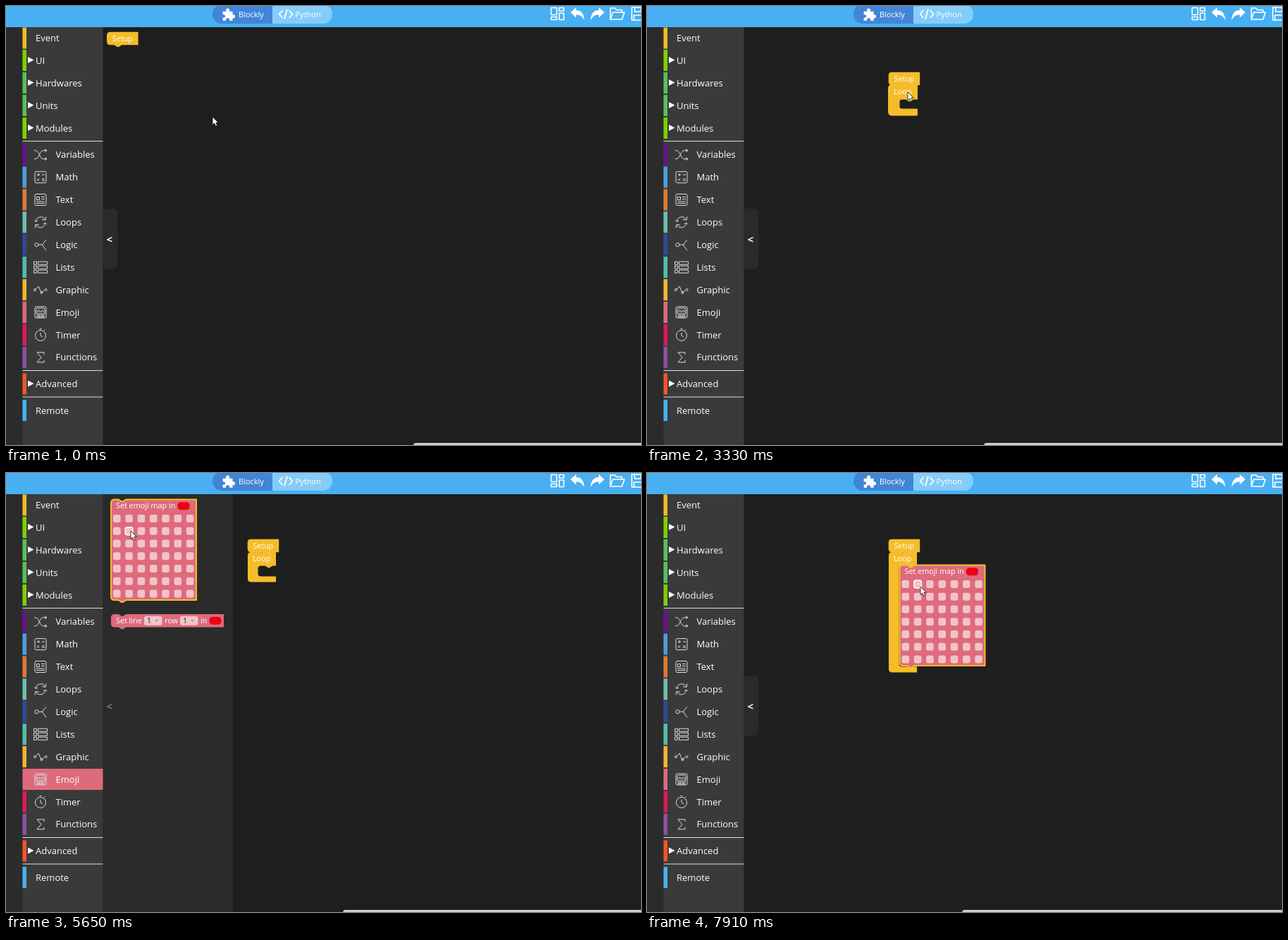
Recreate the animation shown at these times as an HTML page with a canvas. Size 901 px wide and 622 px high, loop 8 s.

```html
<!DOCTYPE html>
<html lang="en">
<head>
<meta charset="utf-8">
<title>Block editor</title>
<style>
  html, body { margin: 0; width: 100%; height: 100%; overflow: hidden; background: #1e1e1e; }
  canvas { display: block; width: 901px; height: 622px; }
</style>
</head>
<body>
<canvas id="stage"></canvas>
<script>
const W = 901, H = 622, LOOP = 8000;
const canvas = document.getElementById('stage');
const g = canvas.getContext('2d');
const dpr = window.devicePixelRatio || 1;
canvas.width = W * dpr;
canvas.height = H * dpr;

const FONT = '"Open Sans", "Noto Sans", sans-serif';
const YELLOW = '#f5bd2a', PINK = '#dd6b7c', RED = '#ee0011', PANEL = '#2a2a2a';

// Screen refreshes: [first, last, count]
const STEPS = [
  [0, 0, 1], [150, 1080, 8], [1200, 1320, 2], [1470, 2130, 6], [2250, 3180, 8], [3330, 4290, 8],
  [4410, 4830, 4], [5110, 5650, 5], [5770, 6050, 3], [6200, 6590, 4], [6740, 7130, 4], [7280, 7910, 6]
];
const TICKS = STEPS.flatMap(([a, b, n]) =>
  Array.from({ length: n }, (_, i) => n > 1 ? a + (b - a) * i / (n - 1) : a));

// Pointer path: [time, x, y]
const PATH = [
  [0, 293, 157], [150, 288, 152], [500, 163, 46], [640, 163, 46], [1080, 368, 95], [1320, 366, 98],
  [1470, 362.5, 103], [1600, 362.5, 103], [1990, 95, 54], [2130, 92, 57], [2250, 92, 57],
  [2550, 170, 46], [2660, 170, 46], [3050, 368, 121], [3330, 370, 122], [3500, 366, 130],
  [4150, 94, 438], [4290, 88, 448], [4430, 88, 455], [4600, 90, 459], [4830, 88, 445],
  [5110, 88, 444], [5230, 92, 400], [5650, 177, 82], [5770, 179, 78], [6050, 193, 56],
  [6200, 206, 66], [6590, 349.5, 144], [7000, 402, 149], [7280, 402, 149], [7450, 400, 152],
  [7780, 388, 161], [8000, 388, 161]
];
const GRABS = [[560, 1560], [2650, 3300], [6150, 7250]];

const ROWS = [
  ['Event', '#f6bb2b', 45.5], ['UI', '#7fd000', 77, 1], ['Hardwares', '#57c25a', 109, 1],
  ['Units', '#57c25a', 141, 1], ['Modules', '#7fd000', 173, 1],
  ['Variables', '#6a1094', 210.7, 'M-9-6h1c7 0 6 12 12 12h5M-9 6h1c7 0 6-12 12-12h5M6-8l3 2-3 2M6 4l3 2-3 2'],
  ['Math', '#4a9ee0', 242.6, 'M-8-6q0-2 2-2H6q2 0 2 2V6q0 2-2 2H-6q-2 0-2-2ZM-5-3.5h4M-3-5.5v4M2-3.5h4M-5 2l3 3M-2 2l-3 3M2 2.5h4M2 4.7h4'],
  ['Text', '#e07a35', 274.5, 'M-8-6q0-2 2-2H6q2 0 2 2V6q0 2-2 2H-6q-2 0-2-2ZM-5.5-4h4v4h-4ZM1-4h5M1-1h5M-6 2.5H6M-6 5H6'],
  ['Loops', '#6cc0ae', 306.4, 'M-7-1C-6-8 3-10 7-4M8-8l-1 5-5-1M7 1C6 8-3 10-7 4M-8 8l1-5 5 1M-7-1l-2-2M-7-1l3-1M7 1l2 2M7 1l-3 1'],
  ['Logic', '#30489c', 338.3, 'M-3 0a2.6 2.6 0 1 1-5.2 0a2.6 2.6 0 1 1 5.2 0ZM-3 0H3M8-7L3-1V1L8 8'],
  ['Lists', '#52bfae', 370.2, 'M-9.5-8h4v4h-4ZM-3.5-8H9.5v4H-3.5ZM-9.5-2h4v4h-4ZM-3.5-2H9.5v4H-3.5ZM-9.5 4h4v4h-4ZM-3.5 4H9.5v4H-3.5Z'],
  ['Graphic', '#f7b52e', 402.1, 'M-9.5 0a1.5 1.5 0 1 0 3 0a1.5 1.5 0 1 0-3 0M-6.5-1L-3-5 1 4 5 1M0 4a1.5 1.5 0 1 0 3 0a1.5 1.5 0 1 0-3 0M6 0a1.5 1.5 0 1 0 3 0a1.5 1.5 0 1 0-3 0'],
  ['Emoji', PINK, 434, 'M-8-6q0-2 2-2H6q2 0 2 2V6q0 2-2 2H-6q-2 0-2-2ZM-6-4q0-2 2-2H4q2 0 2 2V2H-6ZM-4 0v-2q1.5-2 3 0v2M1 0v-2q1.5-2 3 0v2M-5 4H5v2.5H-5ZM-2 4v2.5M2 4v2.5'],
  ['Timer', '#e0185a', 465.9, 'M-7.5 1a7.5 7.5 0 1 0 15 0a7.5 7.5 0 1 0-15 0M0-3V1l3 2M-1.5-8.5h3M5-6l1.5-1.5'],
  ['Functions', '#8e4fa5', 497.8, 'M5-4V-7H-5L1 0-5 7H5V4'],
  ['Advanced', '#f4552b', 535.5, 1], ['Remote', '#48b0f2', 573]
];

function at(t) {
  let i = 1;
  while (i < PATH.length - 1 && PATH[i][0] < t) i++;
  const [t0, x0, y0] = PATH[i - 1], [t1, x1, y1] = PATH[i];
  const p = Math.min(1, (t - t0) / (t1 - t0));
  return { x: x0 + (x1 - x0) * p, y: y0 + (y1 - y0) * p };
}

function rect(x, y, w, h, fill) {
  g.fillStyle = fill;
  g.fillRect(x, y, w, h);
}

function round(x, y, w, h, r, fill, line) {
  g.beginPath();
  g.roundRect(x, y, w, h, r);
  if (fill) { g.fillStyle = fill; g.fill(); }
  if (line) { g.strokeStyle = line; g.stroke(); }
}

function text(s, x, y, size = 10.8, fill = '#fff', weight = 400) {
  g.font = `${weight} ${size}px ${FONT}`;
  g.fillStyle = fill;
  g.fillText(s, x, y + size * 0.36);
}

function icon(d, x, y, { line, fill, width = 1, scale = 1 }) {
  const p = new Path2D(d);
  g.save();
  g.translate(x, y);
  g.scale(scale, scale);
  g.lineWidth = width / scale;
  g.lineJoin = 'round';
  if (fill) { g.fillStyle = fill; g.fill(p); }
  if (line) { g.strokeStyle = line; g.stroke(p); }
  g.restore();
}

const DENT = 'l4.2 2.8h2.2l4.2-2.8';
const BUMP = 'l-4.2 2.8h-2.2l-4.2-2.8';

// A block outline; mouth = [top, bottom] of the inner gap
function shape(w, h, { dent, bump, mouth, tab } = {}) {
  const r = tab ? 0 : 5;
  let d = `M0 ${r}Q0 0 ${r} 0H10.6${dent ? DENT : ''}H${w}`;
  if (mouth) {
    const [a, b] = mouth;
    d += `V${a}H35.2${BUMP}H19Q14.5 ${a} 14.5 ${a + 4}V${b - 4}Q14.5 ${b} 19 ${b}H${w}`;
  }
  d += `V${h}H21.2${bump ? BUMP : ''}H${r}Q0 ${h} 0 ${h - r}`;
  if (tab) d += 'V14C0 9-5.5 16-5.5 9S0 9 0 4.5';
  return d + 'Z';
}

function block(d, x, y, fill, picked) {
  icon(d, x, y, { fill, line: picked && YELLOW, width: 2 });
}

function field(s, x, y, w, fill) {
  round(x, y - 6.5, w, 13, 3, fill);
  text(s, x + 4, y, 10.6, '#222');
  icon('M-2-1.2H2L0 1.6Z', x + w - 8, y, { fill: '#a08c68' });
}

function setup(x, y, held) {
  g.globalAlpha = held ? 0.8 : 1;
  block(shape(44.5, 18.5, { bump: true }), x, y, YELLOW);
  g.globalAlpha = 1;
  if (held) block(shape(44.5, 18.5, { bump: true }), x, y, null, true);
  text('Setup', x + 7.7, y + 9.8);
}

function loopBlock(x, y, gap, { held, picked } = {}) {
  const d = shape(40, 27.5 + gap, { dent: true, mouth: [19.5, 19.5 + gap] });
  g.globalAlpha = held ? 0.8 : 1;
  block(d, x, y, YELLOW);
  g.globalAlpha = 1;
  if (held || picked) block(d, x, y, null, true);
  text('Loop', x + 7, y + 8.8);
}

function emojiMap(x, y, { held, picked, mouse } = {}) {
  block(shape(121, 142.5, { dent: true, bump: true }), x, y, held ? 'rgba(108,105,72,.9)' : PINK);
  if (picked || held) {
    g.globalAlpha = held ? 0.5 : 1;
    block(shape(121, 142.5, { dent: true, bump: true }), x, y, null, true);
    g.globalAlpha = 1;
  }
  text('Set emoji map in', x + 7, y + 9);
  round(x + 94.5, y + 3.7, 17, 11, 4.5, RED);
  for (let i = 0; i < 49; i++) {
    const cx = x + 8.3 + (i % 7) * 17.3, cy = y + 27 + Math.floor(i / 7) * 17.75;
    const over = mouse && Math.abs(mouse.x - cx) < 6 && Math.abs(mouse.y - cy) < 6;
    g.lineWidth = 1.5;
    round(cx - 5.3, cy - 5.5, 10.6, 11, 3, held ? '#c4c1b2' : '#f2c3ca', over && '#fff');
  }
}

function eventFlyout(loopGone) {
  const pale = '#fce5aa';
  rect(138, 30, 199, H - 30, PANEL);
  if (!loopGone) loopBlock(149, 38, 14.5);
  block(shape(140, 42.5, { mouth: [19, 34.5] }), 149, 98.5, YELLOW);
  text('Button', 156, 108);
  field('A', 193.5, 108, 26, pale);
  field('pressed', 226.5, 108, 58, pale);
  block(shape(175, 19, { tab: true }), 149, 159.5, YELLOW);
  text('obtain button', 156, 169);
  field('A', 228.5, 169, 26, pale);
  field('pressed', 262, 169, 58, pale);
}

function emojiFlyout(t, mouse) {
  const pale = '#f2c3ca';
  rect(138, 30, 184, H - 30, PANEL);
  emojiMap(149, 37.5, { picked: t >= 5500, mouse });
  block(shape(160, 18.5, { dent: true, bump: true }), 149, 200, PINK);
  text('Set line', 156, 209.3);
  field('1', 196, 209.3, 25.5, pale);
  text('row', 225, 209.3);
  field('1', 247, 209.3, 25.5, pale);
  text('in', 276, 209.3);
  round(288.5, 203.8, 17, 11, 4.5, RED);
}

function header() {
  rect(0, 0, W, 30, '#48b0f2');
  round(293, -2, 85, 27, [13, 0, 0, 13], '#4285d6');
  round(378, -2, 85, 27, [0, 13, 13, 0], '#85cdf9');
  icon('M-9-4H-4C-6-10 3-10 1-4H6V1C11-1 11 8 6 6V10H1C3 5-6 5-4 10H-9V5C-4 7-4-1-9 1Z', 316, 11.5, { fill: '#fff', scale: 0.93 });
  text('Blockly', 330, 12, 11);
  icon('M-4.5-5.5L-9.5 0-4.5 5.5M4.5-5.5L9.5 0 4.5 5.5M2-7L-2 7', 397, 11.5, { line: '#fff', width: 1.8 });
  text('Python', 410.5, 12, 11);
  const thin = { line: '#fff', width: 1.6 };
  icon('M-9-8.5h8v10h-8ZM2.5-8.5H9v4.5H2.5ZM2.5-1H9v9.5H2.5ZM-9 4.5h8v4h-8Z', 782.5, 11, thin);
  const arrow = 'M-10-2L-2-9V-5C6-5 9 1 9.5 9C6 3 3 1.5-2 1.5V5.5Z';
  icon(arrow, 811, 11, { fill: '#fff' });
  g.save();
  g.translate(839, 11);
  g.scale(-1, 1);
  icon(arrow, 0, 0, { fill: '#fff' });
  g.restore();
  icon('M-9.5 8V-8H-3L-1-5.5H7V-2M-9.5 8L-6-2H10.5L7 8Z', 867, 11, thin);
  icon('M-8-9H6L9-6V9H-8ZM-4-9V-3H5V-9M-5 9V2H6V9', 896, 11, thin);
}

function menu(active, hover) {
  rect(0, 30, 24, H - 30, '#2b2b2b');
  rect(23.5, 30, 114, H - 30, '#3a3a3a');
  for (const y of [191, 516, 553.5]) rect(23.5, y, 114, 1, '#dedede');
  ROWS.forEach(([name, color, y, mark], i) => {
    const lit = i === hover && i !== active;
    if (lit) rect(29, y - 15, 108.5, 30, '#e0e0e0');
    rect(23.5, y - 15, i === active ? 114 : 5.5, 30, color);
    const ink = lit ? '#f8f8f8' : '#fff';
    const drawn = typeof mark === 'string';
    if (drawn) icon(mark, 49, y, { line: lit ? '#f8f8f8' : '#dcdcdc' });
    if (mark === 1) icon('M-4-4.5L4.5 0-4 4.5Z', 35, y - 0.5, { fill: ink });
    text(name, drawn ? 70.5 : 42, y, 13, ink);
  });
}

function pointer(p, held) {
  if (!held) {
    icon('M0 0V11.5L2.7 9 4.6 13.2 6.7 12.2 4.9 8.2H8.3Z', p.x, p.y, { fill: '#fff', line: '#111', width: 0.8 });
    return;
  }
  icon('M-6-1C-6-4-4-4-3-3.5C-3-6 0-6 .5-4.5C2-6 4-5 4-3.5C6-4 6.5-2 6 1C5.5 5 3 6 0 6S-6 3-6-1Z',
    p.x, p.y, { fill: '#fff', line: '#111', width: 1.2 });
  icon('M-3-3V-.5M.5-4V-.5M4-3V-.5M-3 1Q0-1 3 1', p.x, p.y, { line: '#333', width: 0.8 });
}

function draw(t) {
  const m = at(t);
  const held = GRABS.findIndex(([a, b]) => t >= a && t < b);
  const free = held < 0 ? m : null;
  const active = t >= 2100 && t < 2700 ? 0 : t >= 5200 && t < 6250 ? 12 : -1;
  const hover = free && m.x > 23 && m.x < 138 ? ROWS.findIndex(r => Math.abs(m.y - r[2]) <= 16) : -1;

  g.setTransform(dpr, 0, 0, dpr, 0, 0);
  rect(0, 0, W, H, '#1e1e1e');
  for (let y = 38; y < H; y += 14.2)
    for (let x = 144; x < W; x += 14.2) rect(Math.round(x), Math.round(y), 1, 1, '#333');

  // Setup and Loop in the workspace
  const sx = t < 560 ? 143 : held === 0 ? m.x - 20 : 342.7;
  const sy = t < 560 ? 36.7 : held === 0 ? m.y - 9.5 : 93.7;
  const placed = t >= 7250;
  if (held !== 0) setup(sx, sy);
  if (t >= 3300) loopBlock(343, 112, placed ? 162.5 - 19.5 : 15, { picked: t < 5500 });

  round(138, 287, 20.5, 85.5, [0, 7, 7, 0], PANEL);
  if (active === 0) eventFlyout(held === 1);
  if (active === 12) emojiFlyout(t, held < 0 ? free : null);
  text('<', 142.5, 331, 15, active < 0 ? '#fff' : '#8c8c8c', active < 0 ? 700 : 600);

  menu(active, hover);
  header();
  const bar = t < 1560 ? 578 : placed ? 447 : 478;
  round(bar, 619, W - bar + 10, 10, 4, '#cecece');

  if (placed) emojiMap(358.5, 130.5, { picked: true, mouse: free });
  if (held === 0) setup(sx, sy, true);
  if (held === 1) loopBlock(m.x - 21, m.y - 8, 14.5, { held: true });
  if (held === 2) emojiMap(m.x - 43.8, m.y - 18.5, { held: true });
  pointer(m, held >= 0);
}

function frame(now) {
  const t = now % LOOP;
  draw(TICKS.findLast(k => k <= t + 0.5));
  requestAnimationFrame(frame);
}
requestAnimationFrame(frame);
</script>
</body>
</html>
```
